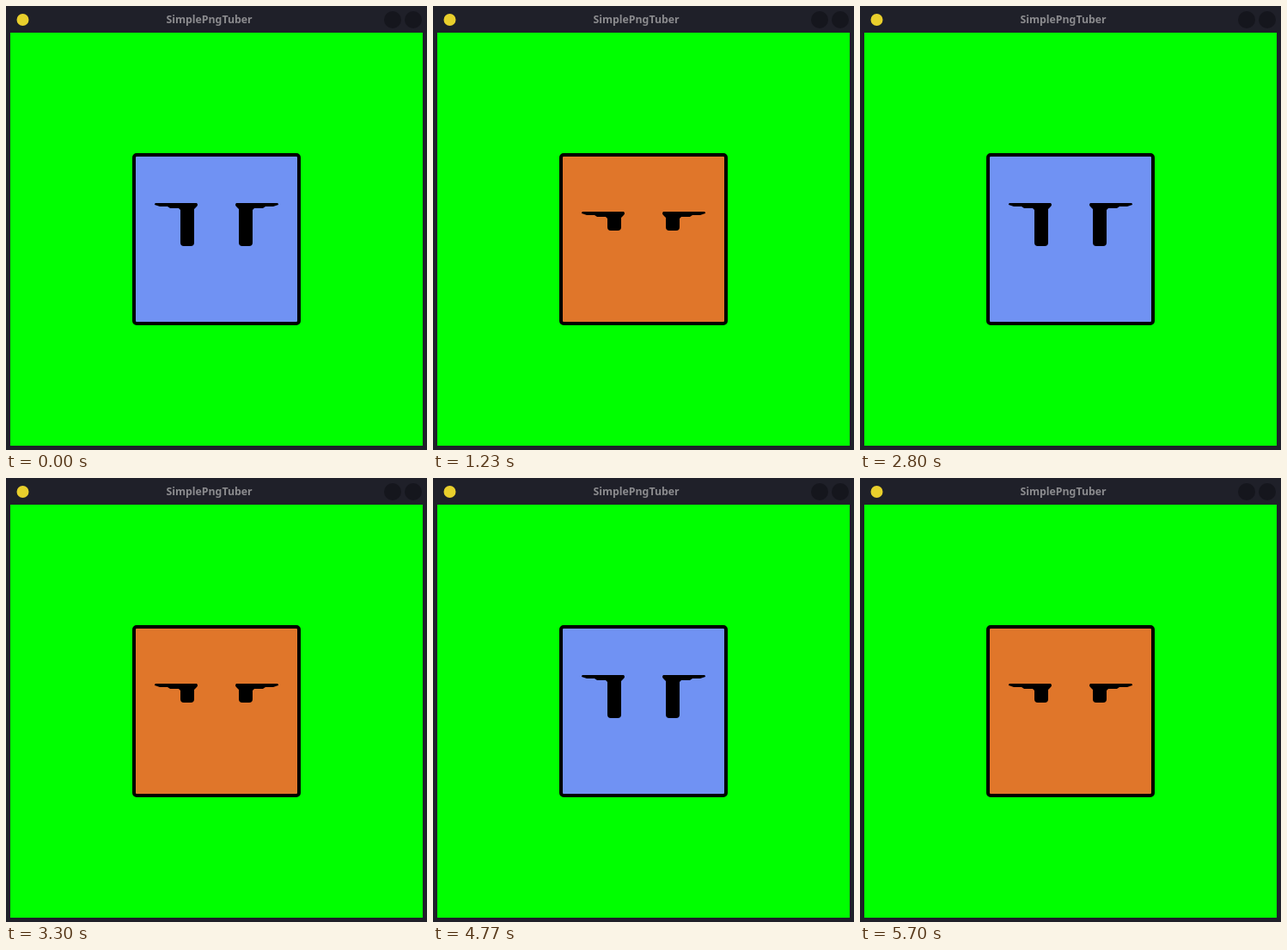
An HTML page for the animation above (5730 ms loop, 490 by 516 pixels).

```html
<!DOCTYPE html>
<html lang="en">
<head>
<meta charset="utf-8">
<title>SimplePngTuber</title>
<style>
  html, body { margin: 0; width: 100%; height: 100%; overflow: hidden; background: #1f2029; }
  svg { display: block; width: 490px; height: 516px; }
  .title { font: bold 12.3px "Noto Sans", "Open Sans", sans-serif; fill: #8b8b8e; text-anchor: middle; }
  .face { stroke: #000; stroke-width: 4; }
  .talking { animation: talk 5730ms step-end infinite; }
  .silent { animation: talk 5730ms step-end infinite; --on: 0; --off: 1; }

  @keyframes talk {
    0%, 13.61%, 26.7%, 45.55%, 65.97%, 78.53% { opacity: var(--off, 0); }
    5.76%, 18.85%, 37.17%, 57.07%, 69.11%, 89.53%, 100% { opacity: var(--on, 1); }
  }
</style>
</head>
<body>
<svg viewBox="0 0 490 516">
  <defs>
    <path id="open" d="M173 230L174 229H222Q224 231 222 233L219 236V275Q219 279 215 279H207Q203 279 203 275V237L201 235H191L188 233H179L173 231Z"/>
    <path id="squint" d="M173 240L174 239H222Q224 241 222 243L219 246V257Q219 261 215 261H207Q203 261 203 257V247L201 245H191L188 243H179L173 241Z"/>
  </defs>

  <rect width="490" height="516" fill="#1f2029"/>
  <circle cx="19.500" cy="16" r="7" fill="#e9cf2c"/>
  <text class="title" x="236.500" y="20">SimplePngTuber</text>
  <g fill="#15161d">
    <circle cx="450" cy="16" r="10"/>
    <circle cx="474" cy="16" r="10"/>
  </g>
  <rect x="5" y="31" width="480" height="480" fill="#0f0"/>

  <g class="silent">
    <rect class="face" x="149" y="173" width="192" height="196" rx="3" fill="#7092f3"/>
    <use href="#open"/>
    <use href="#open" transform="matrix(-1 0 0 1 490 0)"/>
  </g>
  <g class="talking">
    <rect class="face" x="149" y="173" width="192" height="196" rx="3" fill="#e0762a"/>
    <use href="#squint"/>
    <use href="#squint" transform="matrix(-1 0 0 1 490 0)"/>
  </g>
</svg>
</body>
</html>
```
